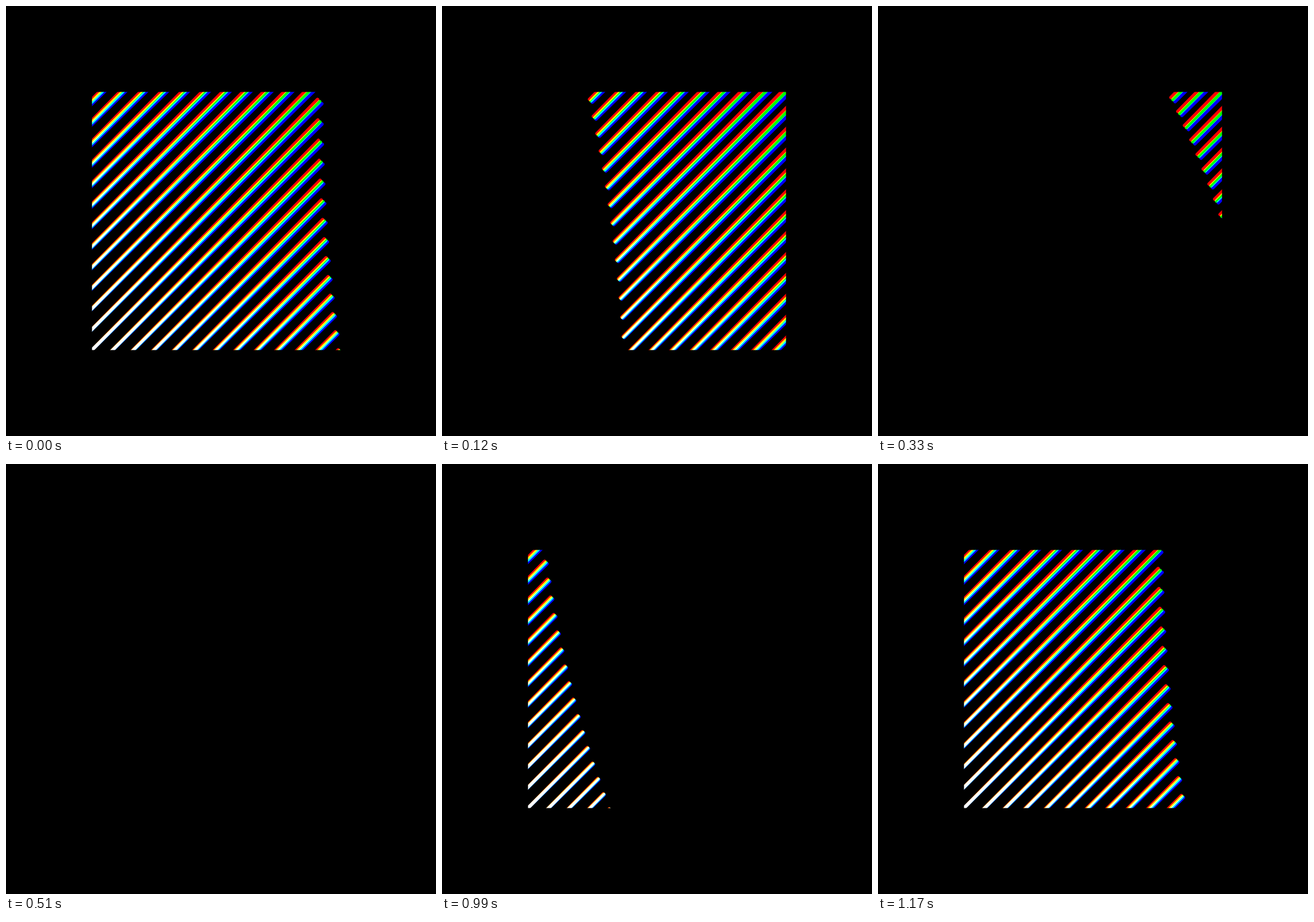
Animation of 748x748 px, one loop 1200 ms. Source, as an HTML page with a canvas:

```html
<!DOCTYPE html>
<html lang="en">
<head>
<meta charset="utf-8">
<title>Prism stripes</title>
<style>
html, body { margin: 0; width: 100%; height: 100%; overflow: hidden; background: #000; }
canvas { display: block; }
</style>
</head>
<body>
<canvas id="stage" width="748" height="748"></canvas>
<script>
const ctx = document.getElementById('stage').getContext('2d');

const SIZE = 748, LOOP = 1200, STEP = 30;
const LEFT = 149.6, SIDE = 448.8, BOTTOM = LEFT + SIDE;
const DIAGONAL = SIDE * Math.SQRT2;
const GAP = 36 / Math.SQRT2, HALF_COUNT = 12;
const START = 748, DELAY = 9.6, DURATION = 960;
const LEAD = 19, OVERSHOOT = 30;
const SPREAD = 0.009;
const CHANNELS = [['#f00', -1], ['#0f0', 0], ['#00f', 1]];

const wrap = t => ((t % LOOP) + LOOP) % LOOP;

// Visible stretch of a line, measured along the diagonal.
function stretch(p) {
  if (p < 0.5) {
    const grow = 4 * p * p;
    return [-LEAD - OVERSHOOT, -LEAD + (DIAGONAL + LEAD) * grow];
  }
  const left = 4 * (1 - p) * (1 - p);
  return [DIAGONAL * (1 - left), DIAGONAL + OVERSHOOT];
}

function draw(t) {
  ctx.setTransform(1, 0, 0, 1, 0, 0);
  ctx.globalCompositeOperation = 'source-over';
  ctx.fillStyle = '#000';
  ctx.fillRect(0, 0, SIZE, SIZE);

  ctx.save();
  ctx.beginPath();
  ctx.rect(LEFT, LEFT, SIDE, SIDE);
  ctx.clip();

  // x runs towards the top right corner, y across the stripes.
  ctx.translate(LEFT, BOTTOM);
  ctx.rotate(-Math.PI / 4);
  ctx.globalCompositeOperation = 'lighter';
  ctx.lineWidth = 6;
  ctx.lineCap = 'round';

  for (let k = -HALF_COUNT; k <= HALF_COUNT; k++) {
    const p = wrap(t - START - DELAY * k) / DURATION;
    if (p >= 1) continue;
    const [tail, head] = stretch(p);
    if (head < tail) continue;
    for (const [color, side] of CHANNELS) {
      const slope = side * SPREAD;
      ctx.strokeStyle = color;
      ctx.beginPath();
      ctx.moveTo(tail, k * GAP + slope * tail);
      ctx.lineTo(head, k * GAP + slope * head);
      ctx.stroke();
    }
  }
  ctx.restore();
}

const origin = performance.now();
function tick() {
  const t = (performance.now() - origin) % LOOP;
  draw(Math.floor(t / STEP) * STEP);
  requestAnimationFrame(tick);
}
tick();
</script>
</body>
</html>
```
